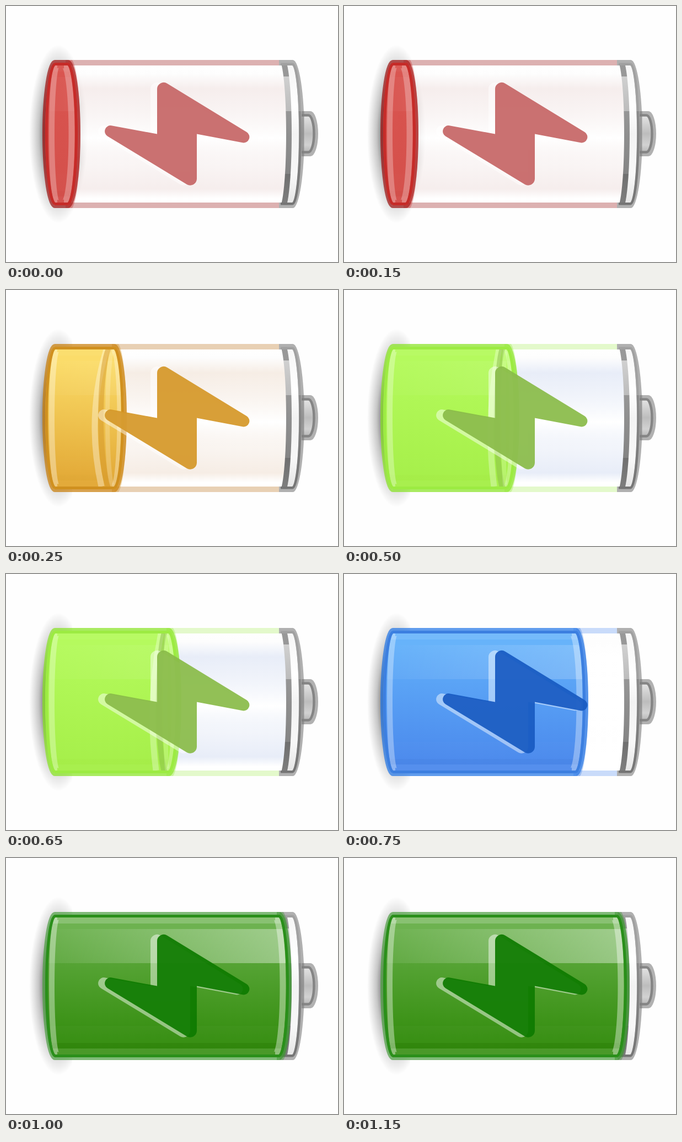
Recreate the animation shown at these times as an HTML page. Size 602 by 465 pixels, loop 1250 ms.

```html
<!DOCTYPE html>
<html lang="en">
<head>
<meta charset="utf-8">
<title>Charging battery</title>
<style>
  html, body { margin: 0; width: 100%; height: 100%; overflow: hidden; background: #fefefe; }
  svg { display: block; width: 602px; height: 465px; }
</style>
</head>
<body>
<svg id="stage" viewBox="0 0 602 465" xmlns="http://www.w3.org/2000/svg"></svg>
<script>
const STEP = 250, TOP = 98, BOTTOM = 367, MID = 232.5;

// x: where the curved right end of the charge begins; lens: depth of its visible far side
const levels = [
  { x: 113, top: '#d9544f', bottom: '#d4504b', rim: '#9b0f0e', line: '#c62b28', glow: .27, gloss: .15,
    strip: '#dcb1b1', tint: '#f3e8e7', bolt: '#c66767' },
  { x: 197, top: '#fbdc68', bottom: '#e2a835', rim: '#c97d05', line: '#d0901f', glow: .34, gloss: .2,
    strip: '#e8d0b4', tint: '#f6ede5', bolt: '#d69829', lens: 30 },
  { x: 296, top: '#b4fa5c', bottom: '#a6ef49', rim: '#87e41f', line: '#9ceb42', glow: .3, gloss: .22,
    strip: '#e3f9cb', tint: '#e8edf8', bolt: '#8abc4a', lens: 24 },
  { x: 421, top: '#62b0fa', bottom: '#4a88ec', rim: '#1f74e7', line: '#3c7fe0', glow: .33, gloss: .5,
    strip: '#c9dbfa', tint: '#ffffff', bolt: '#185bc2' },
  { x: 496, top: '#64ad45', bottom: '#318b0b', rim: '#4c9f41', line: '#2a8f1a', glow: .38, gloss: 1,
    strip: '#83bd7b', tint: '#ffffff', bolt: '#0e7b00' }
];

const attrs = o => Object.entries(o).map(([k, v]) => `${k}="${v}"`).join(' ');
const tag = (name, o) => `<${name} ${attrs(o)}/>`;
const shape = (d, fill, more = {}) => tag('path', { d, fill, ...more });
const line = (d, stroke, width, more = {}) =>
  tag('path', { d, fill: 'none', stroke, 'stroke-width': width, ...more });
const rect = (x, y, width, height, fill, more = {}) => tag('rect', { x, y, width, height, fill, ...more });
const clipped = (id, body) => `<g clip-path="url(#${id})">${body}</g>`;
const stops = list => list.map(([offset, color, opacity = 1]) =>
  tag('stop', { offset, 'stop-color': color, 'stop-opacity': opacity })).join('');
const vertical = (id, y1, y2, list) =>
  `<linearGradient id="${id}" gradientUnits="userSpaceOnUse" x1="0" x2="0" y1="${y1}" y2="${y2}">${stops(list)}</linearGradient>`;

// Half ellipse down from (x, TOP + d), sweep 1 bulges to the right
const side = (x, rx, sweep, d = 0) =>
  `M${x} ${TOP + d}A${rx} ${134.5 - d} 0 0 ${sweep} ${x} ${BOTTOM - d}`;

// Drum with bulging ends, inset by d
const drum = (x, d = 0) => {
  const rx = 22 - d * .85, ry = 134.5 - d, l = 88 + d * .15, r = x - d * .15;
  return `M${l} ${TOP + d}A${rx} ${ry} 0 0 0 ${l} ${BOTTOM - d}H${r}` +
    `A${rx} ${ry} 0 0 0 ${r} ${TOP + d}Z`;
};

const cap = `M497 ${TOP}H520A21 134.5 0 0 1 520 ${BOTTOM}H497A21 134.5 0 0 0 497 ${TOP}Z`;
const knob = d => `M536 ${191 + d}H${552 - d / 2}A${14 - d / 2} ${41 - d} 0 0 1 ${552 - d / 2} ${273 - d}H536`;
const bolt = 'M274 151A12 12 0 0 1 292.2 140.7L436.4 229A10.5 10.5 0 0 1 429.2 248.3L346 232.5V314' +
  'A12 12 0 0 1 327.8 324L184.1 236.5A10.5 10.5 0 0 1 191.3 217.2L274 232.5Z';

const defs = `<defs>
  <radialGradient id="shadow">${stops([[0, '#000', .5], [.5, '#000', .46], [.68, '#000', .22], [.83, '#000', .11], [1, '#000', 0]])}</radialGradient>
  ${vertical('metal', 108, 357, [[0, '#f6f6f6'], [.3, '#ffffff'], [.5, '#f3f3f3'], [.8, '#f8f8f8'], [1, '#e6e6e6']])}
  ${vertical('edge', TOP, BOTTOM, [[0, '#989898'], [.11, '#989898'], [.11, '#d0d0d0'], [.345, '#bcbcbc'],
    [.345, '#969696'], [.77, '#848484'], [.77, '#707070'], [1, '#808080']])}
  ${vertical('groove', TOP, BOTTOM, [[0, '#a0a0a0'], [.345, '#a2a2a2'], [.345, '#8b8b8b'], [1, '#747474']])}
  ${vertical('knob', 191, 273, [[0, '#ededed'], [.5, '#bdbdbd'], [.75, '#d2d2d2'], [1, '#a6a6a6']])}
  <linearGradient id="shine">${stops([[0, '#fff', .06], [1, '#fff', .4]])}</linearGradient>
  <clipPath id="body">${rect(60, TOP, 520, BOTTOM - TOP, '#000')}</clipPath>
</defs>`;

const casing = clipped('body',
  shape(cap, 'url(#metal)') +
  line(side(500, 13, 1), 'url(#edge)', 10) +
  shape('M495 98H520A21 134.5 0 0 1 520 367H495V357H519A12 124.5 0 0 0 519 108H495Z', '#b0b0b0') +
  line('M498 105.8H519.5A14 126.7 0 0 1 519.5 359.2H498', 'url(#groove)', 4.5)) +
  shape(knob(0) + 'Z', '#b1b1b1') +
  shape(knob(8) + 'Z', 'url(#knob)') +
  line(knob(7.5), '#858585', 4.5) +
  rect(536, 191, 4.5, 82, '#808080', { opacity: .7 });

function battery(s, i) {
  const { x, glow, gloss } = s;
  const light = (d, w, k = 1) => line(d, '#fff', w, { opacity: glow * k });
  const band = (y, h, opacity, fill = '#fff') => rect(66, y, x - 44, h, fill, { opacity: opacity * gloss });

  const local = `<defs>
    ${vertical('tube' + i, 108, 357, [[0, '#fff'], [.06, '#fdfdfd'], [.17, s.tint], [.28, s.tint, .75],
      [.53, '#fff'], [.72, s.tint, .55], [.9, s.tint], [.97, '#fff'], [1, '#fff']])}
    ${vertical('charge' + i, 128, 350, [[0, s.top], [1, s.bottom]])}
    <clipPath id="clip${i}">${shape(drum(x, 10), '#000')}</clipPath>
  </defs>`;

  const shadow = tag('ellipse', { cx: 95, cy: MID, rx: 53, ry: 162, fill: 'url(#shadow)' }) +
    (i ? rect(120, 66, 30, 334, '#fefefe') : '');

  const tube = shape('M88 108H497A21 124.5 0 0 1 497 357H88Z', `url(#tube${i})`, { opacity: i ? 1 : .75 }) +
    rect(x - 5, TOP, 500 - x, 10, s.strip) + rect(x - 5, 357, 500 - x, 10, s.strip);

  const glass = band(108, 11, .24) + band(119, 10, .06) + band(129, 62, 1, 'url(#shine)') +
    band(305, 31, .02) + band(336, 10, .04, '#000') + band(346, 11, .12);

  // The far end of the charge seen through its surface
  const end = s.lens
    ? light(`M${x - 15} 108Q${x + 8 - 2 * s.lens} 232 ${x - 24} 357`, 11) +
      line(side(x - 4, s.lens - 9, 0, 1), s.bolt, 10, { opacity: .5 }) +
      light(side(x - 3, s.lens - 20, 0, 10), 8, .6) +
      light(side(x - 4, 12, 1, 10), 7, .9)
    : light(side(x - 8, 14, 1, 10), 11);

  const charge = shape(drum(x, 5), `url(#charge${i})`) +
    clipped('clip' + i, glass + light(side(93, 10, 0, 10), 10) + end) +
    line(drum(x, 2.5), s.rim, 5, { opacity: .7 }) +
    line(drum(x, 7.5), s.line, 5) +
    clipped('body', line(side(x, 17, 1), s.line, 9, { opacity: .35 }));

  const mark = shape(bolt, '#fff', { transform: 'translate(-12)', opacity: .46 }) +
    shape(bolt, s.bolt, { opacity: .93 });

  return `<g class="level" visibility="hidden">${local}${shadow}${tube}${casing}${charge}${mark}</g>`;
}

const stage = document.getElementById('stage');
stage.innerHTML = defs + levels.map(battery).join('');
const groups = [...stage.querySelectorAll('.level')];
const start = performance.now();

function draw() {
  const t = Math.max(0, performance.now() - start);
  const now = Math.floor(t / STEP) % levels.length;
  groups.forEach((g, i) => g.setAttribute('visibility', i === now ? 'visible' : 'hidden'));
  requestAnimationFrame(draw);
}
draw();
</script>
</body>
</html>
```
